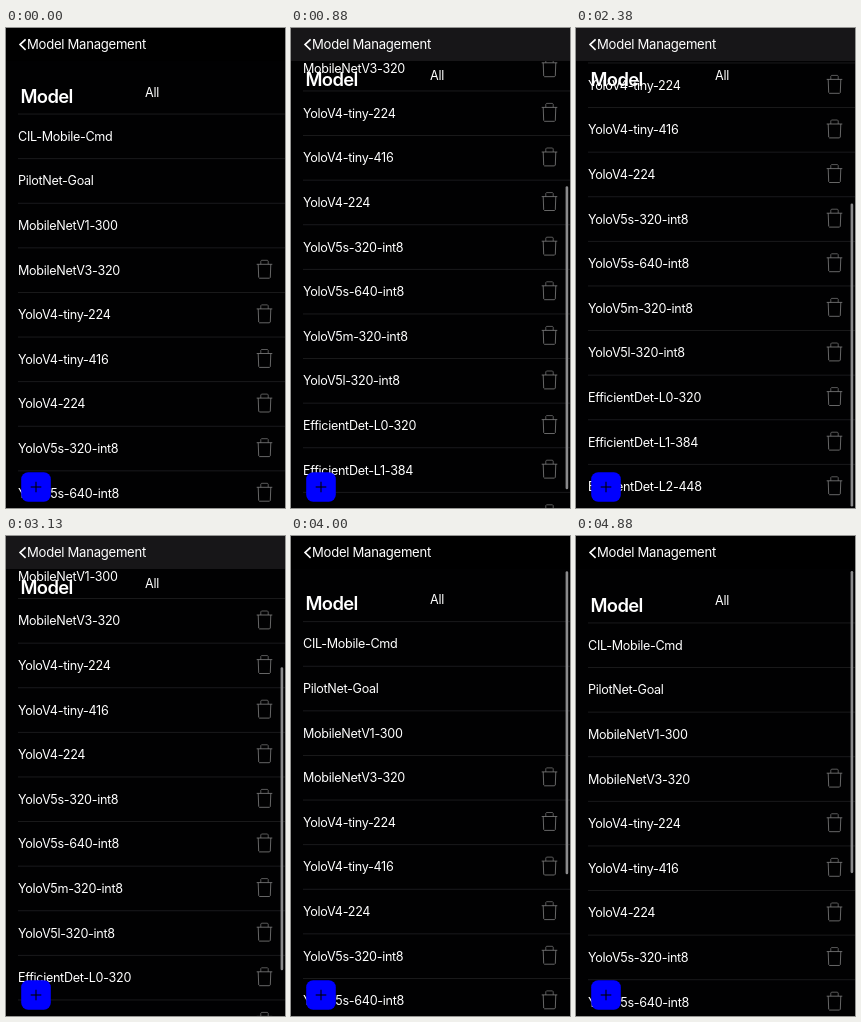
Write an HTML page with a canvas that moves like this. It is 279 by 480 pixels and loops after 5010 ms.

```html
<!DOCTYPE html>
<html lang="en">
<head>
<meta charset="utf-8">
<title>Model Management</title>
<style>
html, body { margin: 0; width: 100%; height: 100%; overflow: hidden; background: #000; }
canvas { display: block; width: 279px; height: 480px; }
</style>
</head>
<body>
<canvas id="stage"></canvas>
<script>
const W = 279, H = 480, LOOP = 5010;
const ROW = 44.6, LIST_TOP = 86, MAX_SCROLL = 229.5, NAV_H = 33;
const MODELS = [
  'CIL-Mobile-Cmd', 'PilotNet-Goal', 'MobileNetV1-300', 'MobileNetV3-320',
  'YoloV4-tiny-224', 'YoloV4-tiny-416', 'YoloV4-224', 'YoloV5s-320-int8',
  'YoloV5s-640-int8', 'YoloV5m-320-int8', 'YoloV5l-320-int8',
  'EfficientDet-L0-320', 'EfficientDet-L1-384', 'EfficientDet-L2-448'
];
// Finger drags as [seconds, scroll offset]
const DRAG_DOWN = [[0.08, 0], [0.25, 28], [0.5, 98], [0.875, 201.5], [1.2, 245], [1.375, 252.2]];
const DRAG_UP = [[2.8, MAX_SCROLL], [3.125, 157.3], [3.5, 65], [4, 0.4], [4.2, -20], [4.3, -25]];

const canvas = document.getElementById('stage');
const ctx = canvas.getContext('2d');
const dpr = window.devicePixelRatio || 1;
canvas.width = W * dpr;
canvas.height = H * dpr;

const clamp = (v, lo, hi) => Math.min(hi, Math.max(lo, v));

// Smooth curve through the points, at rest at both ends
function curve(pts, t) {
  const last = pts.length - 1;
  if (t <= pts[0][0]) return pts[0][1];
  if (t >= pts[last][0]) return pts[last][1];
  const i = pts.findIndex(p => p[0] > t) - 1;
  const slope = k => k === 0 || k === last ? 0
    : (pts[k + 1][1] - pts[k - 1][1]) / (pts[k + 1][0] - pts[k - 1][0]);
  const [t0, a] = pts[i], [t1, b] = pts[i + 1];
  const d = t1 - t0, u = (t - t0) / d, u2 = u * u, u3 = u2 * u;
  return a * (2 * u3 - 3 * u2 + 1) + b * (3 * u2 - 2 * u3)
    + d * (slope(i) * (u3 - 2 * u2 + u) + slope(i + 1) * (u3 - u2));
}

// Critically damped return from an overscroll
const bounce = (amount, t) => amount * (1 + 9 * t) * Math.exp(-9 * t);

function scrollAt(t) {
  if (t < 1.375) return curve(DRAG_DOWN, t);
  if (t < 2.375) return MAX_SCROLL + bounce(22.7, t - 1.375);
  if (t < 4.3) return curve(DRAG_UP, t);
  return bounce(-25, t - 4.3);
}

// The screen refreshes eight times a second
function stepAt(ms) {
  return Math.min(39, 2 * Math.floor(ms / 250) + (ms % 250 >= 130 ? 1 : 0));
}

function text(str, x, y, size, weight = 400, spacing = -0.3) {
  ctx.font = `${weight} ${size}px Inter, "Liberation Sans", sans-serif`;
  ctx.letterSpacing = spacing + 'px';
  ctx.fillStyle = '#fff';
  ctx.fillText(str, x, y + size * 0.363);
}

function line(color, width, ...pts) {
  ctx.strokeStyle = color;
  ctx.lineWidth = width;
  ctx.beginPath();
  pts.forEach(([x, y]) => ctx.lineTo(x, y));
  ctx.stroke();
}

function pill(x, y, w, h, r, color) {
  ctx.fillStyle = color;
  ctx.beginPath();
  ctx.roundRect(x, y, w, h, r);
  ctx.fill();
}

function trash(x, y) {
  const gray = '#808080';
  line(gray, 0.8, [x - 7.8, y - 5.5], [x + 7.8, y - 5.5]);
  line(gray, 0.7, [x - 3.7, y - 5.5], [x - 3.7, y - 8.7], [x - 3, y - 9.5],
    [x + 3, y - 9.5], [x + 3.7, y - 8.7], [x + 3.7, y - 5.5]);
  line(gray, 0.8, [x - 6.3, y - 5.5], [x - 5.8, y + 7.6], [x - 5, y + 8.4],
    [x + 5, y + 8.4], [x + 5.8, y + 7.6], [x + 6.3, y - 5.5]);
}

function drawList(scroll) {
  for (let i = 0; i <= MODELS.length; i++) {
    const y = LIST_TOP + i * ROW - scroll;
    if (y < -ROW || y > H) continue;
    ctx.fillStyle = '#1c1c1e';
    ctx.fillRect(12, y - 0.4, W - 12, 0.9);
    if (i === MODELS.length) break;
    const mid = y + ROW / 2;
    text(MODELS[i], 12, mid, 12.6);
    if (i > 2) trash(258.5, mid - 0.3);
  }
}

function drawHeader(scroll) {
  const shift = Math.min(scroll, 16.5);
  text('Model', 14.5, 68 - shift, 18.4, 600, -0.6);
  text('All', 139, 64 - shift, 12.6);
}

function drawNav(scroll) {
  const tint = clamp(scroll / 12 - 0.05, 0, 1);
  ctx.fillStyle = `rgb(${23 * tint},${22 * tint},${24 * tint})`;
  ctx.fillRect(0, 0, W, NAV_H);
  line('#fff', 1.6, [19.6, 11.3], [14, 16.6], [19.6, 21.9]);
  text('Model Management', 21, 16.7, 13.1, 400, -0.27);
}

function drawScrollbar(scroll) {
  const pos = clamp(scroll, 0, MAX_SCROLL);
  const over = Math.abs(scroll - pos);
  const y = 35 + pos * 0.612 + (scroll > pos ? over : 0);
  pill(274.6, y, 2.6, 303 - over, 1.3, '#8a8a8c');
}

function drawAddButton() {
  pill(15.2, 444.2, 29.6, 29.6, 7, '#0000ff');
  line('#000', 1.1, [24.7, 459], [35.3, 459]);
  line('#000', 1.1, [30, 453.7], [30, 464.3]);
}

function draw(ms) {
  const step = stepAt(ms);
  const scroll = scrollAt(step / 8);
  ctx.setTransform(dpr, 0, 0, dpr, 0, 0);
  ctx.fillStyle = '#010102';
  ctx.fillRect(0, 0, W, H);
  drawList(scroll);
  drawHeader(scroll);
  drawNav(scroll);
  if (step > 0) drawScrollbar(scroll);
  drawAddButton();
}

const start = performance.now();
function tick() {
  draw((performance.now() - start) % LOOP);
  requestAnimationFrame(tick);
}
tick();
</script>
</body>
</html>
```
